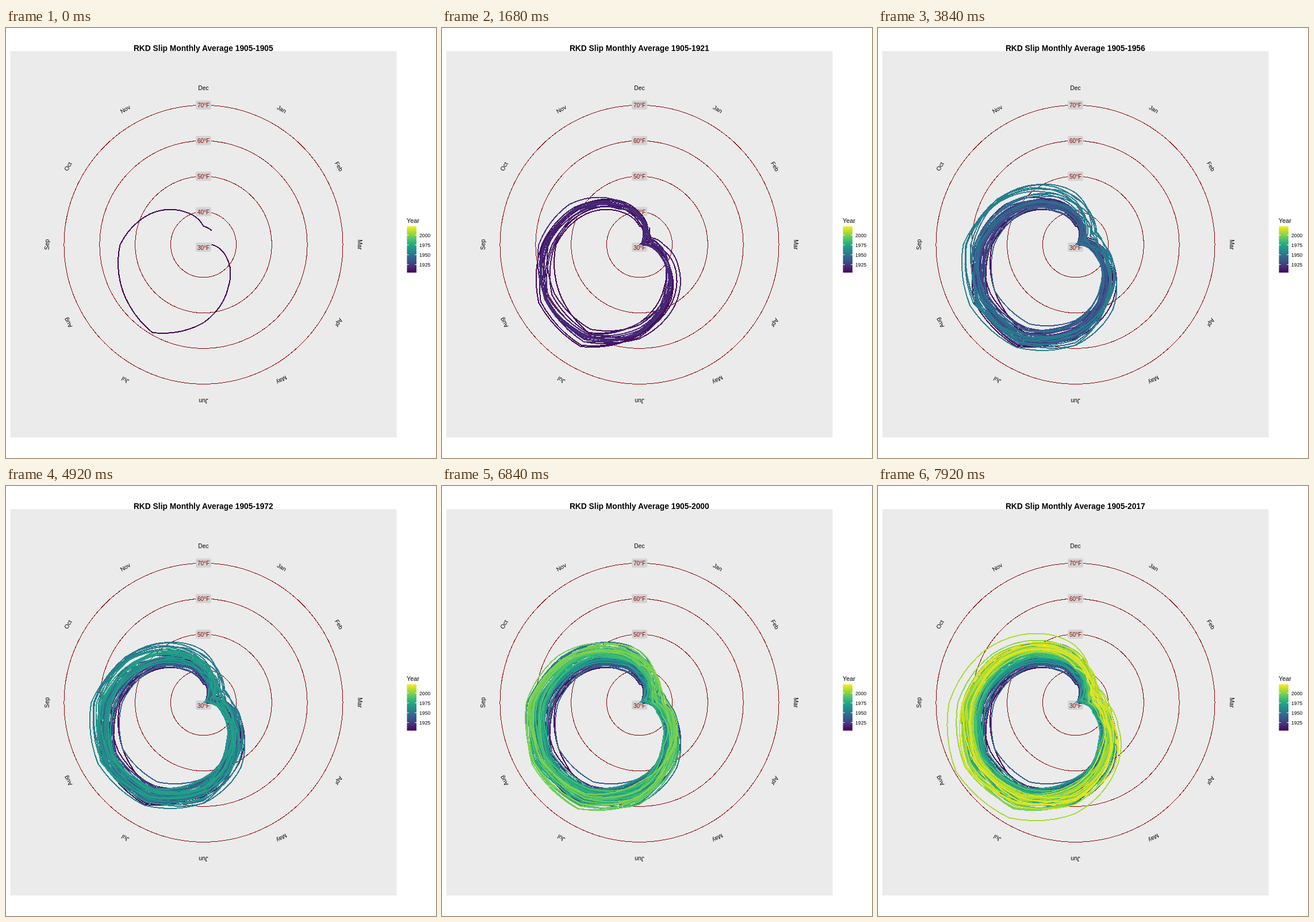
An HTML page for the animation above (8 s loop, 748 px wide and 748 px high).

```html
<!DOCTYPE html>
<html lang="en">
<head>
<meta charset="utf-8">
<title>Monthly average spiral</title>
<style>
  html, body { margin: 0; width: 100%; height: 100%; overflow: hidden; background: #fff; }
  svg { display: block; width: 100%; height: 100%; font-family: "Liberation Sans", Arial, sans-serif; }
  .ring { fill: none; stroke: #8b0000; stroke-width: 1; shape-rendering: crispEdges; }
  .year { fill: none; stroke-width: 2; stroke-linejoin: round; shape-rendering: crispEdges; }
</style>
</head>
<body>
<svg viewBox="0 0 748 748">
  <defs><linearGradient id="scale" x1="0" y1="1" x2="0" y2="0"></linearGradient></defs>
  <rect x="7.5" y="40.3" width="672" height="672" fill="#ebebeb"/>
  <g id="plot"></g>
  <text id="title" x="343.3" y="40" font-size="13.8" font-weight="bold" text-anchor="middle"></text>
  <g id="legend">
    <text x="697" y="339" font-size="10.8">Year</text>
    <rect x="697.5" y="345" width="16.5" height="80.5" fill="url(#scale)"/>
  </g>
</svg>
<script>
const CX = 343.5, CY = 376.8, FIRST = 1905, SCALE_END = 2021;
const GAP_START = 1943, GAP_YEARS = 3, RECORDS = 110;
const LOOP = 8000, HOLD = 720, STEP = 120;
const MONTHS = 'Jan Feb Mar Apr May Jun Jul Aug Sep Oct Nov Dec'.split(' ');
const VIRIDIS = ['440154', '482475', '414487', '355f8d', '2a788e', '21918c',
  '22a884', '44bf70', '7ad151', 'bddf26', 'fde725'];

// Key radii of the opening curve, March to January
const OPENING = [14, 47, 86, 136, 177, 162, 145, 107, 66, 32, 28];
// Exceptional years: peak month, size and spread in months
const EXTREMES = {
  1913: { month: 4, size: 24, spread: 1.5 },
  1940: { month: 7.5, size: -27, spread: 2.3 },
  2002: { month: 8.8, size: 22, spread: 2.5 },
  2006: { month: 8, size: 38, spread: 4 }
};

const $ = id => document.getElementById(id);
const bell = x => Math.exp(-x * x / 2);
const clamp01 = x => Math.min(1, Math.max(0, x));
const monthCos = x => Math.cos(x * Math.PI / 6);

function add(parent, tag, attrs, text) {
  const node = document.createElementNS('http://www.w3.org/2000/svg', tag);
  for (const name in attrs) node.setAttribute(name, attrs[name]);
  if (text) node.textContent = text;
  return parent.appendChild(node);
}
function random(seed) {
  const v = Math.sin(seed * 12.9898 + 4.137) * 43758.5453;
  return v - Math.floor(v);
}
function polar(angle, r) {
  const a = angle * Math.PI / 180;
  return [CX + r * Math.sin(a), CY - r * Math.cos(a)];
}
function yearColor(year) {
  const p = (year - FIRST) / (SCALE_END - FIRST) * 10, i = Math.min(9, Math.floor(p));
  const channel = k => {
    const [a, b] = [VIRIDIS[i], VIRIDIS[i + 1]].map(c => parseInt(c.substr(k * 2, 2), 16));
    return Math.round(a + (b - a) * (p - i));
  };
  return `rgb(${[0, 1, 2].map(channel)})`;
}
function recordYear(index) {
  const year = FIRST + index;
  return year < GAP_START ? year : year + GAP_YEARS;
}

function seasonal(month) {
  return 97 + 88 * monthCos(month - 7.77) + 8 * monthCos(2 * (month - 1));
}
// Slow warming, strongest in winter, with a warm spell and a cool spell
function climate(year, winter) {
  const warmSpell = bell((year - 1952.5) / 2.5), coolSpell = bell((year - 1966) / 6);
  return 28 * winter * clamp01((year - 1940) / 60)
    + warmSpell * (11 + 20 * winter)
    + (1 - winter) * (6 * clamp01((year - 1980) / 30) - 10 * coolSpell);
}
function monthRadius(year, month) {
  if (month > 12) return monthRadius(year + 1, month - 12);
  const winter = 0.5 + 0.5 * monthCos(month - 11.5);
  const mean = seasonal(month) + climate(year, winter);
  const extreme = EXTREMES[year];
  if (extreme) return mean + extreme.size * bell((month - extreme.month) / extreme.spread);
  const k = year * 12 + month;
  const noise = (random(k) + random(k + 1) - 1) * 19 + (random(year * 7.7) - 0.5) * 20;
  return Math.max(0, mean + noise * (1 - 0.3 * winter));
}
function yearPath(year) {
  const start = year === FIRST ? 3 : 1, parts = 6, points = [];
  const radius = m => year === FIRST ? OPENING[m - start] : monthRadius(year, m);
  for (let m = start; m < 13; m++) {
    const a = radius(m), b = radius(m + 1);
    for (let s = 0; s <= parts; s++) {
      const f = s / parts;
      points.push(polar((m + f) * 30, a + (b - a) * f).map(v => v.toFixed(1)));
    }
  }
  return 'M' + points.join('L');
}

const plot = $('plot'), legend = $('legend');
const middle = { 'text-anchor': 'middle' };
for (let f = 30; f <= 70; f += 10) {
  const r = 57 + (f - 40) * 6.185, y = CY - r;
  if (r > 0) add(plot, 'circle', { class: 'ring', cx: CX, cy: CY, r });
  add(plot, 'rect', { x: 330, y: y - 8.3, width: 27, height: 16, rx: 3, fill: '#d3d3d3' });
  add(plot, 'text', { ...middle, x: CX, y: y + 4.2, 'font-size': 10, fill: '#8b0000' }, f + '°F');
}
MONTHS.forEach((name, i) => {
  const angle = (i + 1) * 30, [x, y] = polar(angle, 272);
  add(plot, 'text', { ...middle, y: 3.6, 'font-size': 10.3,
    transform: `translate(${x} ${y}) rotate(${angle})` }, name);
});

const curves = [];
for (let i = 0; i < RECORDS; i++) {
  const year = recordYear(i);
  curves.push(add(plot, 'path', { class: 'year', d: yearPath(year), stroke: yearColor(year) }));
}

VIRIDIS.forEach((c, i) => add($('scale'), 'stop', { offset: i / 10, 'stop-color': '#' + c }));
for (let year = 1925; year <= 2000; year += 25) {
  const y = 411.5 - (year - 1925) * 0.685;
  add(legend, 'path', { d: `M697.5 ${y}h3M711 ${y}h3`, stroke: '#fff', 'stroke-width': 1 });
  add(legend, 'text', { x: 719, y: y + 3.4, 'font-size': 8.7 }, String(year));
}

let shown;
function draw() {
  const t = performance.now() % LOOP;
  const step = t < HOLD ? 0 : Math.floor((t - HOLD) / STEP) + 1;
  const last = Math.floor(step * 1.785 + 0.13);
  if (last !== shown) {
    shown = last;
    curves.forEach((c, i) => { c.style.display = i <= last ? '' : 'none'; });
    $('title').textContent = `RKD Slip Monthly Average ${FIRST}-${recordYear(last)}`;
  }
  requestAnimationFrame(draw);
}
draw();
</script>
</body>
</html>
```
